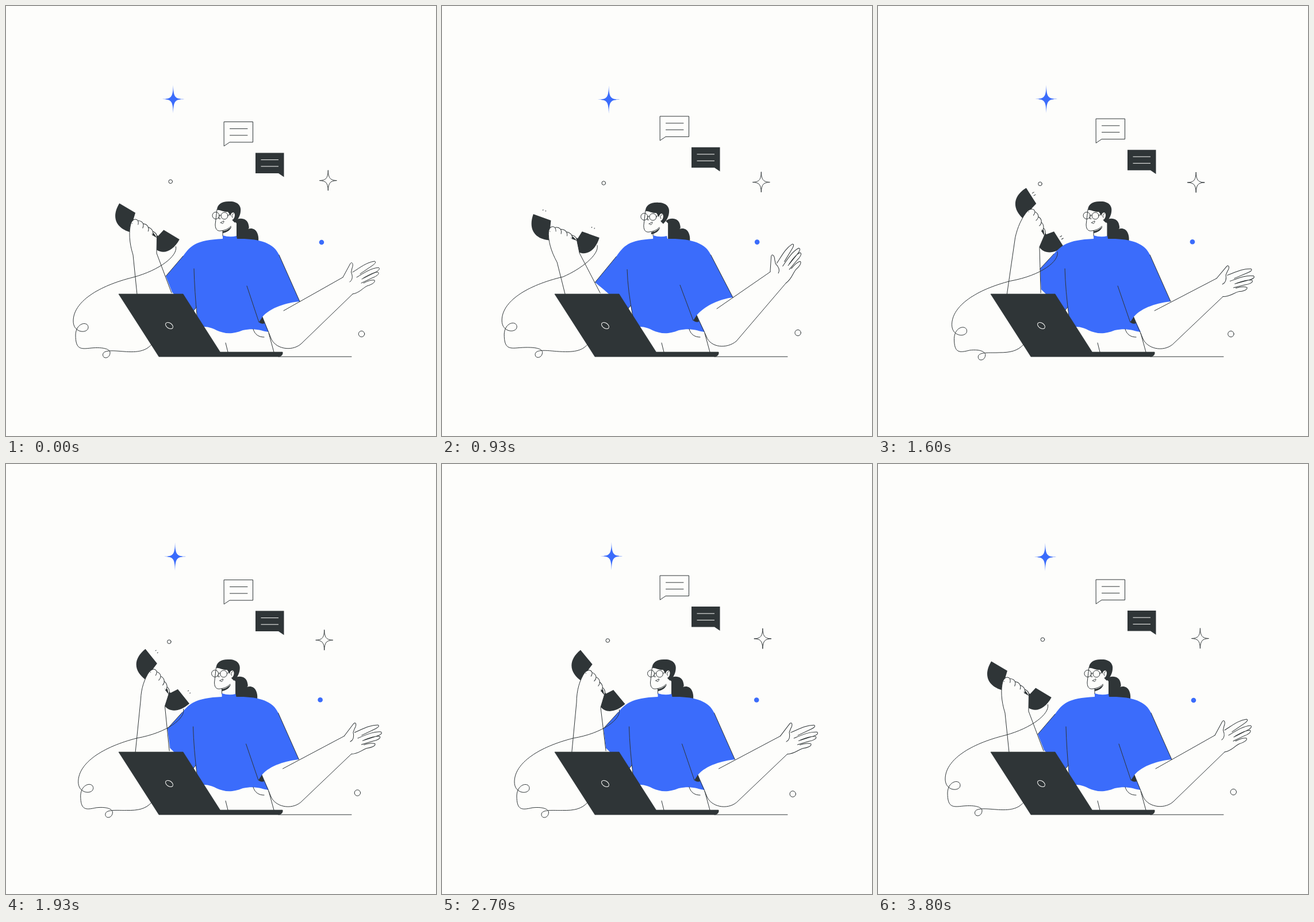
These frames come from a looping animation (748x748 px, 3.83 s). An HTML page:

```html
<!DOCTYPE html>
<html lang="en">
<head>
<meta charset="utf-8">
<title>Phone call</title>
<style>
  html, body { margin: 0; width: 100%; height: 100%; overflow: hidden; background: #fdfdfb; }
  svg { display: block; width: 100vw; height: 100vh; }
  .line { fill: none; stroke: #2f3537; stroke-width: 1; stroke-linecap: round; stroke-linejoin: round; }
  .paper { fill: #fdfdfb; }
  .dark { fill: #2f3537; }
  .edge { stroke: #2f3537; stroke-width: 0.8; }
  .blue { fill: #3b6cfb; }
  .light { fill: none; stroke: #fdfdfb; stroke-width: 1; }
</style>
</head>
<body>
<svg viewBox="0 0 748 748">
  <path id="blueStar" class="blue"/>
  <path id="lineStar" class="line"/>
  <circle id="ring" class="line" r="3.3"/>
  <circle id="bigRing" class="line" r="5.2"/>
  <circle id="dot" class="blue" r="4.3"/>
  <path id="lineBubble" class="line" d="M0 0H50V35.5H9.5L0 42ZM10 12H40.5M10 23.5H40.5"/>
  <g id="darkBubble">
    <path class="dark" d="M0 0H49.5V42L40 35.5H0Z"/>
    <path class="light" d="M9.5 12H40M9.5 23.5H40"/>
  </g>

  <path id="tail" class="dark" d="M397 374C405 367 420 368 422 381C423 385 423 387 421 388C432 384 441 393 439 411L401 408V378Z"/>
  <path id="neck" class="line" d="M377 389V400"/>

  <g id="phone">
    <path class="dark" d="M-61 0H-28.5L-26 10L-18 33C-42 40 -61 30 -61 0ZM29 0H61C62 22 52 37 36 36L26 20L14 17V14H26Z"/>
    <path id="sound" class="line"/>
  </g>
  <path id="armFill" class="paper"/>
  <path id="shirt" class="blue"/>
  <path id="armLine" class="line"/>
  <path id="fingers" class="line" style="fill:#fdfdfb"
    d="M-26 19C-27 8 -17 5 -14 15M-17 9C-11 6 -5 8 -4 16M-7 9C-1 6 6 9 7 16M3 10C9 8 16 11 17 18M14 12C20 11 24 14 26 18"/>
  <path id="shade" class="dark"/>
  <path id="seams" class="line"/>
  <path class="line" d="M382 586L386 602M457 569L466 602M430 562C433 572 440 576 449 576"/>

  <path id="forearm" class="line"/>
  <path id="hand" class="line" d="M586 472L599 448C602 444 605 449 602 456L600.5 463C604 472 602 477 598 480
    M603 463C616 455 627 446 641 444C645 445 641 449 638 451L616 466
    M610 472C623 464 635 456 648 455C652 457 647 461 643 463L619 475
    M622 473C634 466 641 463 647 463C651 466 643 471 637 473L618 482
    M622 482C630 478 636 476 641 477C643 481 635 485 628 487C620 491 615 499 603 501"/>

  <g id="head">
    <path class="paper" d="M367 352L364 380C364 390 369 392 374 391C384 390 390 386 394 377L398 356Z"/>
    <path class="line" d="M367 354L364 380C364 390 369 392 374 391C382 390 388 387 391 383"/>
    <path class="dark" d="M367 355C367 345 376 339 390 340C403 340 410 348 408 358C407 366 403 372 398 377L394 373L388 361L386 358C379 359 372 354 367 355Z
      M377 391.5C384 391 389 387 392.5 383C391 389 385 394 377 395Z"/>
    <ellipse class="paper" cx="394" cy="365.5" rx="3.8" ry="6.5" transform="rotate(15 394 365.5)"/>
    <path class="line" d="M394 368C392 365 393 362 396 361M371 364H374M386 364L391 362M371 366L370 370H373M373 377C376 376 377 374 379 374C379 378 376 380 374 377"/>
    <circle class="line" cx="365" cy="364.5" r="6"/>
    <circle class="line" cx="380" cy="365" r="6"/>
  </g>

  <path class="dark edge" d="M196 501H308L372.5 602H481C482 607 478 610 474 610H266Z"/>
  <ellipse class="light" cx="284" cy="556" rx="7.2" ry="4.6" transform="rotate(35 284 556)"/>
  <path class="line" d="M474 610H601"/>
  <path id="cord" class="line"/>
</svg>
<script>
const LOOP = 3830;
const el = {};
document.querySelectorAll('[id]').forEach(node => el[node.id] = node);

const draw = (id, d) => el[id].setAttribute('d', d);
const place = (id, transform) => el[id].setAttribute('transform', transform);

// Step response of a damped spring, t in ms.
function spring(t) {
  if (t <= 0) return 0;
  const damp = 5.2, freq = 8.3, s = t / 1000;
  return 1 - Math.exp(-damp * s) * (Math.cos(freq * s) + damp / freq * Math.sin(freq * s));
}

// -1 is the lowered pose, 0 rest, 1 raised.
const pose = t => 2 * spring(t - 1185) - spring(t - 40) - spring(t - 2660);
const mix = (p, low, rest, high) => rest + (p < 0 ? rest - low : high - rest) * p;

function star(x, y, a, b) {
  return `M0 ${-y}C${a} ${-b} ${b} ${-a} ${x} 0C${b} ${a} ${a} ${b} 0 ${y}` +
    `C${-a} ${b} ${-b} ${a} ${-x} 0C${-b} ${-a} ${-a} ${-b} 0 ${-y}Z`;
}
draw('blueStar', star(19.5, 24.5, 0.6, 3));
draw('lineStar', star(15, 17.5, 0.5, 3.8));

function drift(t) {
  const turn = 2 * Math.PI * t / LOOP;
  const wander = (id, x, y, rx, ry, px, py) =>
    place(id, `translate(${x + rx * Math.cos(turn - px)} ${y + ry * Math.cos(turn - py)})`);
  wander('blueStar', 292.4, 161.5, 2.7, 1.3, -2.2, 1.25);
  wander('lineStar', 557, 305, 3.8, 2.1, -0.5, 2.3);
  wander('ring', 285, 307.3, 4, 2.1, -1.25, 2.75);
  wander('bigRing', 615, 571.2, 5.3, 2.8, 0.85, -1.85);
  wander('dot', 547.8, 410.6, 1.2, 0.4, 0.25, 0);
  const bob = 6 * Math.cos(2 * turn - 0.6);
  place('lineBubble', `translate(379.5 ${196.5 + bob})`);
  place('darkBubble', `translate(434 ${250.5 + bob})`);
}

// Maps points from a frame with pivot (px, py) to the stage after a rotation.
function rig(x, y, deg, px = 0, py = 0) {
  const c = Math.cos(deg * Math.PI / 180), s = Math.sin(deg * Math.PI / 180);
  return (u, v) => [x + (u - px) * c - (v - py) * s, y + (u - px) * s + (v - py) * c];
}

// Two short strokes leave each cup after the phone has moved.
function drawSound(t) {
  const u = (t % 1000 - 520) / 440;
  if (t > 2000 || u < 0 || u > 1) return draw('sound', '');
  const near = -4 - 9 * Math.max(0, 2 * u - 1), far = -4 - 9 * Math.min(1, 2 * u);
  draw('sound', [-45, 45].map(c => [-2.5, 2.5].map(o =>
    `M${c + o} ${near}L${c + o} ${far}`).join('')).join(''));
}

function drawPhoneArm(p, lead) {
  const x = mix(p, 216, 249.5, 282), y = mix(lead, 382.5, 374.5, 369);
  const deg = mix(p, 19.5, 31, 52);
  const at = rig(x, y, deg);
  const move = `translate(${x} ${y}) rotate(${deg})`;
  place('phone', move);
  place('fingers', move);
  const left = `M${mix(lead, 214, 228, 225)} 501L${mix(p, 200, 221, 235)} ${mix(lead, 446, 433, 408)}` +
    `C${at(-11, 50)} ${at(-22, 34)} ${at(-26, 19)}`;
  const right = `${at(26, 18)}L${mix(p, 239, 262, 277)} ${mix(lead, 430, 430, 421)}` +
    `L${mix(lead, 275, 288, 284)} 499`;
  draw('armFill', `${left}L${right}Z`);
  draw('armLine', `${left}M${right}`);
  return at(62, 14);
}

function drawCord([x, y], p) {
  const u = mix(p, -13, 0, 9), v = mix(p, -1, 0, 5), h = u / 2, w = v * 0.6;
  draw('cord', `M${x} ${y}C${x + 4} ${y + 16} ${x - 28} ${y + 41} ${221 + u * 0.8} ${472 + v}
    C${160 + u} ${487 + v} ${117 + u} ${515 + v} ${117 + u} ${548 + v}
    C${117 + u} ${570 + v} ${143 + u} ${570 + v} ${143 + u} ${559 + v}
    C${143 + u} ${548 + v} ${122 + u} ${550 + v} ${121 + u} ${572 + v}
    C${121 + u} ${598 + v} ${130 + u} ${597 + v} ${148 + u} ${595 + w}
    C${170 + h} ${593 + w} ${181 + h} ${597 + w} ${181 + h} ${603 + w}
    C${181 + h} ${613 + w} ${169 + h} ${615 + w} ${168.5 + h} ${607 + w}
    C${168 + h} ${597 + w} ${190 + h} ${600 + w} ${205 + h} ${601 + w / 2}
    C230 603 243 600 253 589`);
}

function drawBody(p) {
  const n = mix(p, -10, 0, -1.5), r = mix(p, -7.5, 0, -1.5);
  const s = mix(p, -5, 0, -1.5), k = mix(p, -3, 0, -1);
  const drop = mix(p, -7, 0, 0), hem = mix(p, -3, 0, 0);
  const cuff = `${446 + k} ${541 + hem}`;
  const corner = `${511 + s} ${514 + drop}`;
  const tip = `${mix(p, 266, 278, 281)} ${mix(p, 481, 470, 460)}`;
  const shoulder = `${308 + s} ${435 + mix(p, 1, 0, -3)}`;
  const armpit = `${440 + k} ${550 + hem}`;
  const slit = `${331 + k} ${524 + hem}L${325 + k} ${532 + hem}`;
  draw('shirt', `M${377 + n} 399Q${389 + n} 403 ${401 + n} 400L${402 + n} 405
    C${440 + r} 404 ${466 + r} 412 ${475 + r} 433L${corner}
    C${490 + s} ${516 + drop} ${460 + k} ${524 + hem} ${cuff}L457 567
    C445 566 436 559 412 564C392 572 380 570 366 564C357 559 350 558 343 558
    L333 543L${slit}L${mix(p, 281, 289, 285)} ${mix(p, 493, 498, 494)}L${tip}
    L${shoulder}C${321 + s} 417 ${330 + s} 407 ${377 + n} 405Z`);
  draw('shade', `M${armpit}L${cuff}L${450 + k} ${552 + hem}Q${444 + k} ${554 + hem} ${armpit}Z`);
  draw('seams', `M${327 + s} ${457 - hem / 2}Q${328 + s} 495 332.5 543
    M${419 + s} ${487 + hem / 2}L${armpit}M${475 + r} 433L${corner}M${shoulder}L${tip}M${slit}`);
  place('tail', `translate(${mix(p, -8, 0, -2)} 0)`);
  place('neck', `translate(${n} 0)`);

  const x = mix(p, 584.5, 594.5, 594.5), y = mix(p, 472, 486.5, 489);
  const deg = mix(p, -25, 0, 9);
  const at = rig(x, y, deg, 594.5, 486.5);
  place('hand', `translate(${x} ${y}) rotate(${deg}) translate(-594.5 -486.5)`);
  const e = mix(p, -5, 0, 0.5), q = k / 3;
  draw('forearm', `M${483 + s} ${530 + drop / 2}L${at(586, 472)}
    M${cuff}L${461 + q} ${578 + hem}
    C${468 + q} ${596 + e / 3} ${496 + q} ${602 + e} ${513 + q} ${588 + e}L${at(603, 501)}`);
}

function render(t) {
  const p = pose(t), lead = pose(t + 50), late = pose(t - 50), nod = pose(t - 25);
  drift(t);
  drawSound(t);
  drawBody(late);
  drawCord(drawPhoneArm(p, lead), late);
  place('head', `translate(${mix(nod, -13.3, 0, -1.5)} ${mix(nod, 2, 0, 0)})`);
}

function tick() {
  render(performance.now() % LOOP);
  requestAnimationFrame(tick);
}
tick();
</script>
</body>
</html>
```
